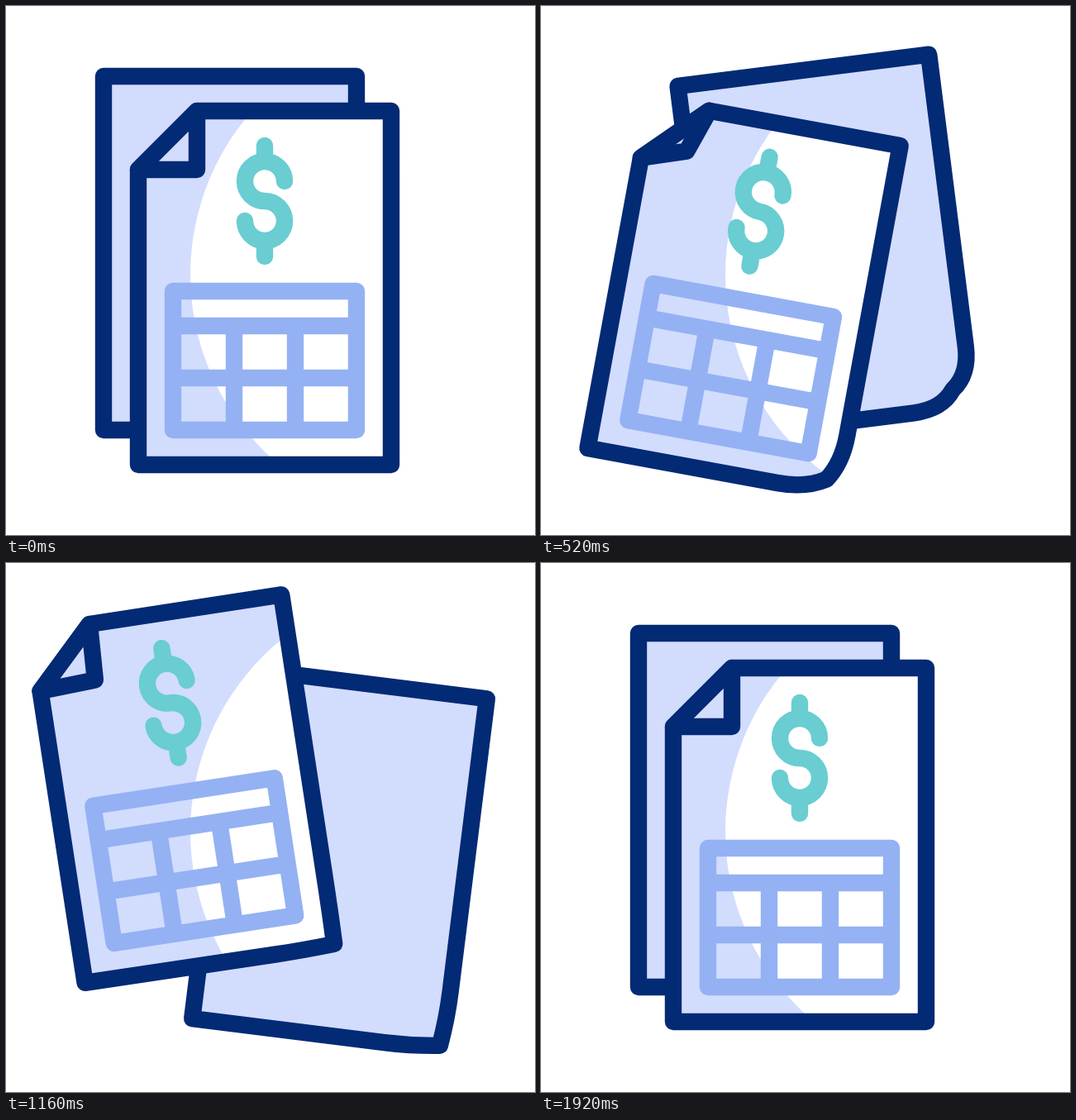
These frames come from a looping animation (640 by 640 pixels, 2000 ms). An HTML page with a canvas:

```html
<!DOCTYPE html>
<html lang="en">
<head>
<meta charset="utf-8">
<title>Invoice sheets</title>
<style>
html, body { margin: 0; width: 100%; height: 100%; overflow: hidden; background: #fff; }
canvas { display: block; width: 100vw; height: 100vh; }
</style>
</head>
<body>
<canvas width="640" height="640"></canvas>
<script>
const ctx = document.querySelector('canvas').getContext('2d');
const NAVY = '#032a74', PALE = '#d2dcfd', BLUE = '#94b1f3', TEAL = '#69cdd1';
const LOOP = 2000, STEP = 40;

// Progress from 0 to 1 between two times, plain, eased, or there and back.
const span = (t, from, to) => Math.min(1, Math.max(0, (t - from) / (to - from)));
const ease = (t, from, to) => (1 - Math.cos(Math.PI * span(t, from, to))) / 2;
const bump = (t, from, to) => Math.sin(Math.PI * span(t, from, to)) ** 2;

// Out along a curve, then straight home.
function travel(t, [x1, y1], [x2, y2], [x3, y3]) {
  const p = ease(t, 80, 960), home = 1 - ease(t, 1000, 1860);
  const at = (a, b, c) => home * (3 * p * (1 - p) ** 2 * a + 3 * p * p * (1 - p) * b + p ** 3 * c);
  return { x: at(x1, x2, x3), y: at(y1, y2, y3) };
}

// Eased swings in degrees from rest at 80 ms, each given as [end time, angle].
function swing(t, ...stops) {
  let start = 80, angle = 0;
  for (const [end, next] of stops) {
    angle += (next - angle) * ease(t, start, end);
    start = end;
  }
  return angle;
}

function poses(t) {
  const out = bump(t, 80, 960), back = bump(t, 1040, 1830);
  return {
    rear: {
      ...travel(t, [51, -22], [96, -23], [144.5, 64]),
      turn: swing(t, [520, -7.2], [1060, 8], [1520, 0]),
      curl: 22 * (out + back), sag: 0
    },
    front: {
      ...travel(t, [-42, 29], [-102, 25], [-107.5, -74]),
      turn: swing(t, [520, 10.4], [1000, -7.4], [1400, -11.2], [1870, 0]),
      curl: 15 * out + 3.5 * back, sag: 5 * back, fold: 18 * out + 16 * back
    }
  };
}

function place(pose, cx, cy) {
  ctx.translate(cx + pose.x, cy + pose.y);
  ctx.rotate(pose.turn * Math.PI / 180);
  ctx.translate(-cx, -cy);
}

function line(path, ...points) {
  points.forEach(([x, y], i) => i ? path.lineTo(x, y) : path.moveTo(x, y));
}

// A sheet with a cut upper left corner and a curling lower right one.
function sheetPath(left, top, cut, { curl, sag }) {
  const right = left + 306, bottom = top + 428;
  const path = new Path2D();
  line(path, [left, top + cut], [left + cut, top], [right, top], [right, bottom - 72]);
  path.quadraticCurveTo(right, bottom - 38, right - curl, bottom - curl);
  path.quadraticCurveTo(right - 38, bottom + sag, right - 72, bottom + sag);
  path.lineTo(left, bottom);
  path.closePath();
  return path;
}

function stroke(path, color) {
  ctx.strokeStyle = color;
  ctx.stroke(path);
}
function fill(path, color) {
  ctx.fillStyle = color;
  ctx.fill(path);
}

const table = new Path2D();
table.rect(202, 345, 222, 168);
for (const y of [387, 450]) line(table, [202, y], [424, y]);
for (const x of [276, 350]) line(table, [x, 387], [x, 513]);

const dollar = new Path2D();
line(dollar, [313, 169], [313, 188]);
dollar.moveTo(337, 212);
dollar.arc(313, 212, 24, 0, Math.PI / 2, true);
dollar.arc(313, 260, 24, -Math.PI / 2, Math.PI);
line(dollar, [313, 284], [313, 303]);

const disc = new Path2D();
disc.arc(523, 325, 300, 0, 2 * Math.PI);

function drawRear(pose) {
  ctx.save();
  place(pose, 271, 299);
  const sheet = sheetPath(118, 85, 0, pose);
  fill(sheet, PALE);
  stroke(sheet, NAVY);
  ctx.restore();
}

function drawFront(pose) {
  const sheet = sheetPath(160, 127, 71, pose);
  ctx.save();
  place(pose, 313, 341);
  fill(sheet, PALE);

  // The bright disc stays still while the sheet moves over it.
  ctx.save();
  ctx.clip(sheet);
  ctx.resetTransform();
  fill(disc, '#fff');
  ctx.restore();

  stroke(table, BLUE);
  stroke(dollar, TEAL);
  const flap = new Path2D();
  line(flap, [160, 198], [231, 127], [231 - pose.fold, 198 - pose.fold]);
  flap.closePath();
  fill(flap, PALE);
  stroke(flap, NAVY);
  stroke(sheet, NAVY);
  ctx.restore();
}

ctx.lineWidth = 20.4;
ctx.lineCap = ctx.lineJoin = 'round';

function draw() {
  const t = Math.floor(performance.now() % LOOP / STEP) * STEP;
  const { rear, front } = poses(t);
  ctx.fillStyle = '#fff';
  ctx.fillRect(0, 0, 640, 640);
  drawRear(rear);
  drawFront(front);
  requestAnimationFrame(draw);
}
draw();
</script>
</body>
</html>
```
